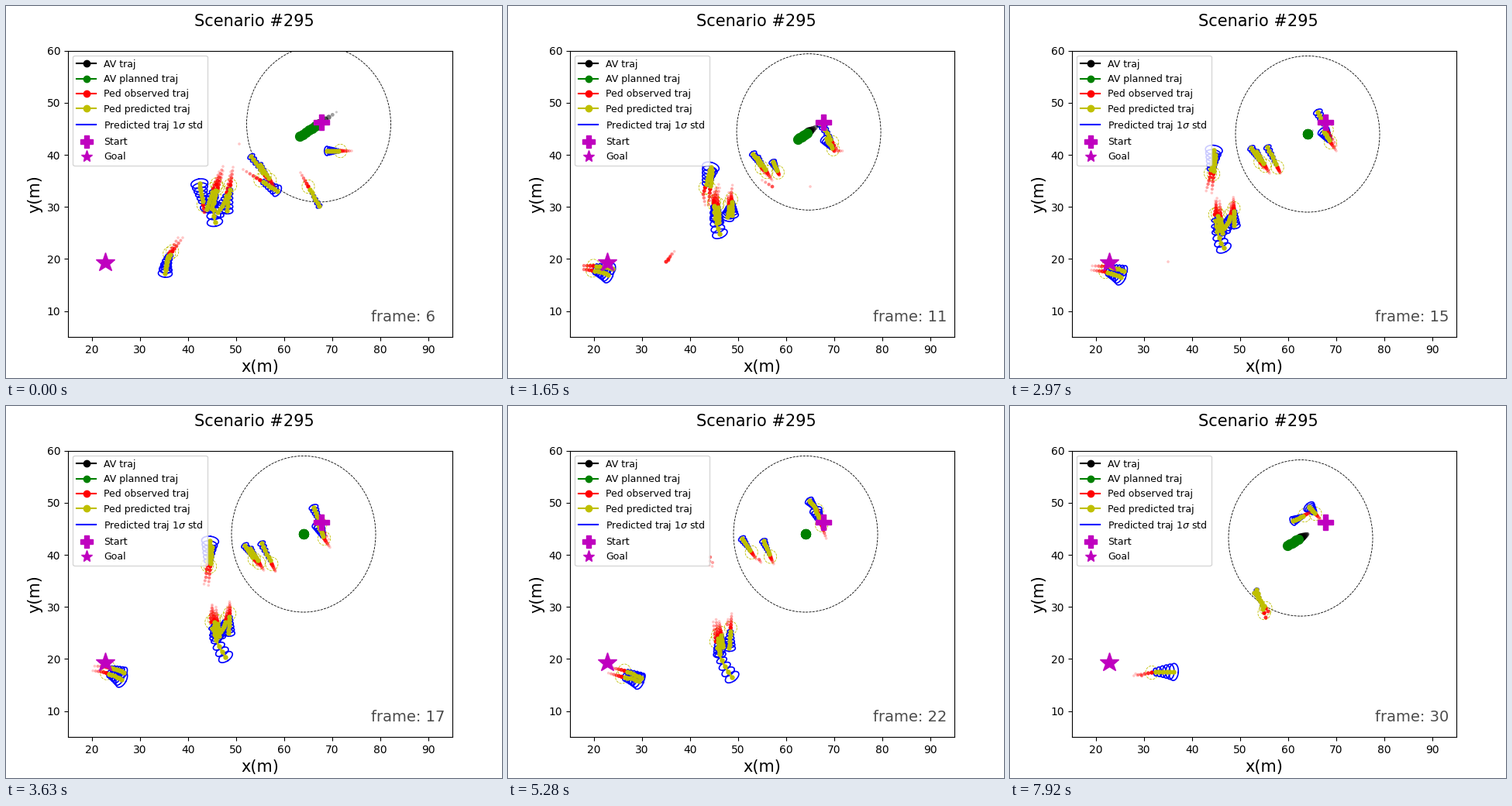
A matplotlib script for the animation above (8 s loop, 640x480 px).

```python
import numpy as np
import matplotlib.pyplot as plt
from matplotlib.animation import FuncAnimation
from matplotlib.lines import Line2D
from matplotlib.patches import Ellipse

STEP_MS, TICK_MS, LOOP_MS = 330, 40, 8000
FIRST = 6
AGES = np.arange(5, -1, -1)          # observed steps, oldest first
AHEAD = np.arange(1, 7) / 6          # predicted points, 1 = full reach

fig = plt.figure(figsize=(6.4, 4.8), dpi=100)
ax = fig.add_subplot()
ax.set_xlim(15, 95)
ax.set_ylim(5, 60)
ax.set_xticks(range(20, 91, 10))
fig.suptitle("Scenario #295", fontsize=15)
ax.set_xlabel("x(m)", fontsize=15)
ax.set_ylabel("y(m)", fontsize=15)


def to_data(p):
    """Stage pixels (y down) to metres."""
    p = np.asarray(p, float)
    return np.stack([15 + (p[..., 0] - 80) / 6.2,
                     5 + (427.2 - p[..., 1]) / 6.72], axis=-1)


class Ped:
    """Walks through points evenly spaced in time from birth to death.

    reach: steps looked ahead, spread: final sideways deviation,
    turn: heading change over the prediction, in radians.
    """

    def __init__(self, birth, death, *points, reach=6, spread=6, turn=0.0):
        self.birth, self.death = birth, death
        self.points = np.array(points, float)
        self.times = np.linspace(birth, death, len(points))
        self.reach, self.spread, self.turn = reach, spread, turn

    def at(self, t):
        return np.array([np.interp(t, self.times, c) for c in self.points.T])

    def alive(self, t):
        return self.birth <= t <= self.death

    def predict(self, t):
        """Predicted points and the heading at each of them."""
        t0, t1 = max(t - 2, self.birth), min(t + 2, self.death)
        vx, vy = (self.at(t1) - self.at(t0)) / (t1 - t0)
        heading = np.arctan2(vy, vx) + self.turn * AHEAD
        stride = np.hypot(vx, vy) * self.reach / len(AHEAD)
        moves = stride * np.stack([np.cos(heading), np.sin(heading)], axis=1)
        return self.at(t) + np.cumsum(moves, axis=0), heading


PEDS = [
    # right side, leader and follower
    Ped(-5, 24, (446, 187), (425, 187), (408, 158), (398, 132), (380, 141)),
    Ped(4, 24, (421, 187), (411, 172), (403, 149), (394, 139), spread=8),
    # inside the ring, heading down and then up
    Ped(-5, 0, (380, 215), (390, 233), reach=7, spread=4),
    Ped(-5, 3, (306, 211), (341, 233), reach=5, spread=8),
    Ped(-5, 17, (343, 231), (330, 213), (322, 200), (313, 187), reach=10, spread=5),
    Ped(-5, 13, (348, 236), (335, 216), (324, 198), reach=9, spread=4),
    Ped(2, 18, (350, 218), (347, 212), (341, 200), (337, 191), reach=12, spread=5),
    # lower left pair
    Ped(-5, 4, (228, 299), (216, 315), (204, 330), reach=7, spread=9, turn=-.6),
    Ped(-5, 3, (222, 299), (212, 317), (207, 328), spread=8, turn=-.4),
    # pair walking up beside the legend
    Ped(-2, 13, (256, 266), (252, 243), (258, 221), (261, 195), spread=11),
    Ped(1, 12, (259, 256), (264, 202), reach=5, spread=5),
    # central group walking down
    Ped(-5, 17, (280, 207), (268, 241), (264, 272), (269, 309),
        reach=10, spread=10, turn=-.5),
    Ped(-5, 17, (275, 214), (264, 246), (268, 270), (271, 300), spread=8),
    Ped(-5, 17, (280, 213), (270, 245), (272, 274), (275, 296), spread=6),
    Ped(-5, 17, (293, 208), (288, 242), (289, 263), (287, 290), reach=7, spread=8),
    Ped(-5, 13, (290, 214), (284, 246), (286, 262), (283, 282), spread=9, turn=.5),
    # far left pair passing the goal
    Ped(2, 24, (98, 340), (124, 343), (149, 350), (183, 344),
        spread=11, turn=.25),
    Ped(2, 21, (98, 335), (124, 336), (145, 340), (170, 348), spread=7, turn=.2),
    # late arrivals below the ring, and one already gone
    Ped(23, 24, (330, 273), (328, 267), reach=5, spread=3),
    Ped(23, 24, (333, 265), (330, 261), reach=5, spread=2),
    Ped(-6, -5, (301, 178), (301, 178)),
]


def av_at(k):
    """The vehicle brakes to a stop, waits, then sets off again."""
    brake = max(0, 1 - k / 8) ** 1.6
    start = max(0, k / 4 - 5) ** 1.3
    return np.array([384 + 19.5 * brake - 9 * start,
                     165.2 - 13 * brake + 5.1 * start])


# fixed marks and legend
ax.plot(67.8, 46.2, "mP", ms=14, zorder=4.5)
ax.plot(22.8, 19.3, "m*", ms=18.5, zorder=4.5)
entries = [("k", "o", "-", 6, "AV traj"), ("g", "o", "-", 6, "AV planned traj"),
           ("r", "o", "-", 6, "Ped observed traj"),
           ("y", "o", "-", 6, "Ped predicted traj"),
           ("b", "", "-", 6, r"Predicted traj 1$\sigma$ std"),
           ("m", "P", "", 11, "Start"), ("m", "*", "", 11, "Goal")]
ax.legend(handles=[Line2D([], [], color=c, marker=m, ls=ls, ms=ms, label=name)
                   for c, m, ls, ms, name in entries],
          loc="upper left", fontsize=9)
label = ax.text(78, 8, "", fontsize=14, alpha=0.7)

# moving parts
ring = Ellipse((0, 0), 30, 30, fill=False, ls="--", lw=0.6)
ax.add_patch(ring)
zone, = ax.plot([], [], "y--", lw=0.6, zorder=2)
sigma, = ax.plot([], [], "b-", lw=1.2, zorder=2.2)
seen = ax.scatter([], [], zorder=2.4)
guess, = ax.plot([], [], "yo-", ms=3.6, lw=2, zorder=2.6)
driven = ax.scatter([], [], zorder=3)
planned, = ax.plot([], [], "go-", ms=8.5, zorder=3.2)

TURN = np.linspace(0, 2 * np.pi, 41)
GAP = np.full((1, 2), np.nan)


def oval(center, along, across, heading=0.0):
    u, v = along * np.cos(TURN), across * np.sin(TURN)
    c, s = np.cos(heading), np.sin(heading)
    return center + np.stack([u * c - v * s, u * s + v * c], axis=1)


def set_line(line, parts):
    pieces = [q for p in parts for q in (p, GAP)] or [GAP]
    line.set_data(*to_data(np.vstack(pieces)).T)


def set_dots(dots, pts, ages, color, small, big):
    fresh = 1 - np.asarray(ages) / AGES[0]
    rgba = np.zeros((len(pts), 4))
    rgba[:, :3] = color
    rgba[:, 3] = 0.22 + 0.78 * fresh
    dots.set_offsets(to_data(pts))
    dots.set_sizes((small + (big - small) * fresh) ** 2)
    dots.set_facecolor(rgba)
    dots.set_edgecolor("none")


def show(k):
    label.set_text(f"frame: {FIRST + k}")
    av = av_at(k)
    ring.set_center(to_data(av))
    set_dots(driven, [av_at(k - a) for a in AGES], AGES, (0, 0, 0), 2.2, 8.5)
    set_line(planned, [av + 6 * AHEAD[:, None] * (av - av_at(k - 1))])

    zones, ovals, lines, dots, dot_ages = [], [], [], [], []
    for ped in PEDS:
        for age in AGES:
            if ped.alive(k - age):
                dots.append(ped.at(k - age))
                dot_ages.append(age)
        if ped.alive(k):
            pts, heading = ped.predict(k)
            across = ped.spread * (0.35 + 0.65 * AHEAD)
            zones.append(oval(ped.at(k), 8.1, 8.7))
            ovals += [oval(p, 0.55 * w, w, h)
                      for p, w, h in zip(pts, across, heading)]
            lines.append(pts)
    set_line(zone, zones)
    set_line(sigma, ovals)
    set_line(guess, lines)
    set_dots(seen, dots, dot_ages, (1, 0, 0), 2.6, 3.9)


def update(i):
    show(min((i * TICK_MS + TICK_MS - 1) // STEP_MS, (LOOP_MS - 1) // STEP_MS))


anim = FuncAnimation(fig, update, frames=LOOP_MS // TICK_MS, interval=TICK_MS,
                     init_func=lambda: show(0), repeat=True, repeat_delay=0)
plt.show()
```
